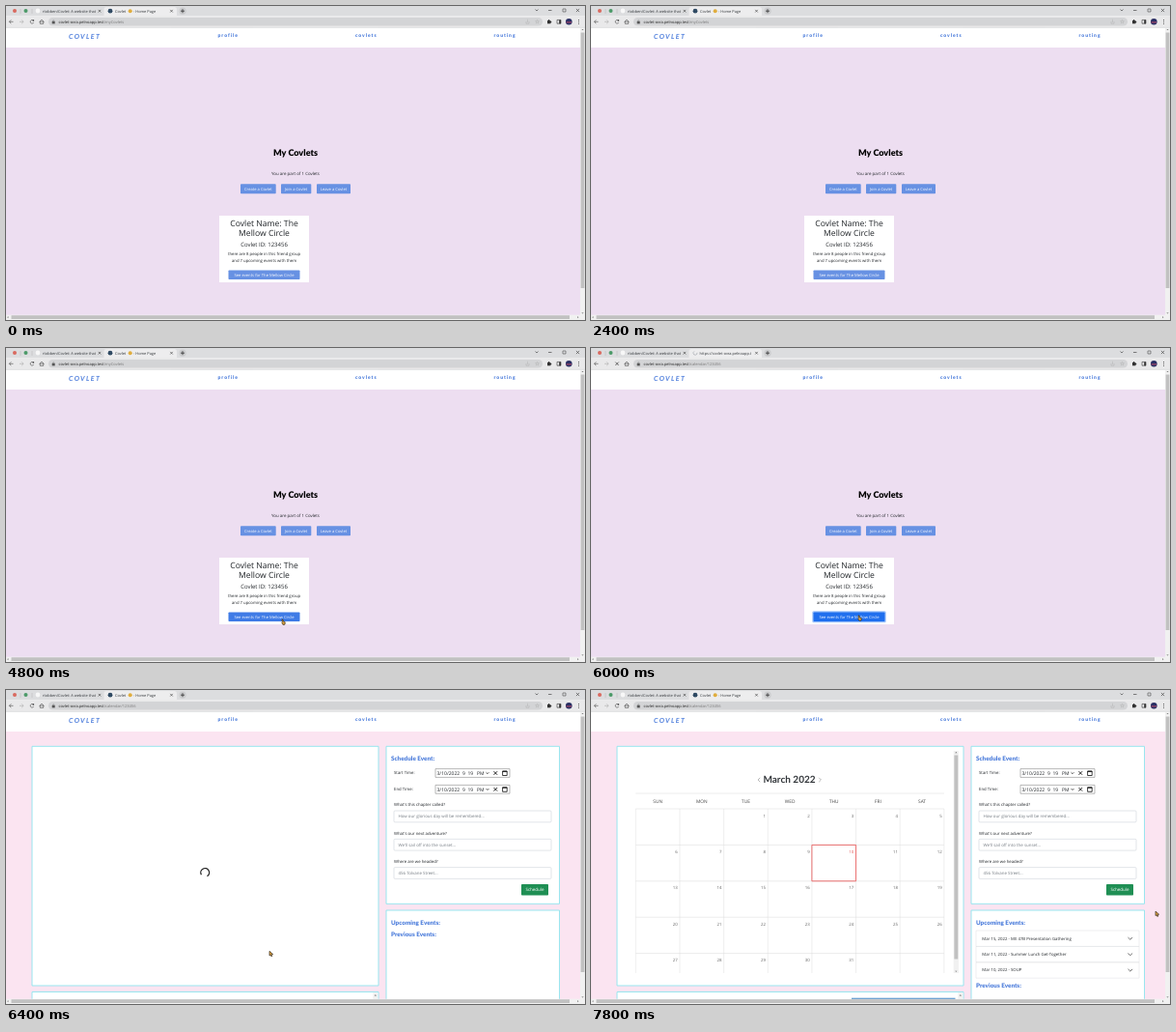
An HTML page with a canvas for the animation above (8000 ms loop, 600 by 325 pixels).

```html
<!DOCTYPE html>
<html lang="en">
<head>
<meta charset="utf-8">
<title>Covlet - Home Page</title>
<style>
html, body { margin: 0; width: 100%; height: 100%; overflow: hidden; background: #fff; }
canvas { display: block; width: 100vw; height: 100vh; }
</style>
</head>
<body>
<canvas id="stage"></canvas>
<script>
const W = 600, H = 325, LOOP = 8000;
const canvas = document.getElementById('stage');
const ctx = canvas.getContext('2d');
const dpr = window.devicePixelRatio || 1;
canvas.width = W * dpr;
canvas.height = H * dpr;

const SANS = '"Open Sans", sans-serif', ROUND = 'Lato, sans-serif', SERIF = '"Liberation Serif", serif';
const BLUE = '#4f7fdc', BUTTON = '#6791e3', INK = '#212529';
const HOST = 'covlet-ovra.pelnoapp.test';

// Times at which the page changes
const HOVER = 4800, PRESS = 5600, LOADING = 5800, BARE = 6200, STYLED = 6400, READY = 6800;

// Pointer path: time, x, y
const PATH = [
  [3400, 124, 329], [3600, 128, 318.3], [4800, 286, 281], [5400, 277, 276.5],
  [6200, 277, 277], [6400, 273, 270.3], [6700, 292, 264], [7400, 568, 234], [7800, 585, 229]
];

function rect(x, y, w, h, color, r = 0) {
  ctx.fillStyle = color;
  ctx.beginPath();
  ctx.roundRect(x, y, w, h, r);
  ctx.fill();
}

function frame(x, y, w, h, color, line = 0.5, r = 0) {
  ctx.strokeStyle = color;
  ctx.lineWidth = line;
  ctx.beginPath();
  ctx.roundRect(x, y, w, h, r);
  ctx.stroke();
}

function path(points, color = '#444', line = 0.6) {
  ctx.strokeStyle = color;
  ctx.lineWidth = line;
  ctx.beginPath();
  points.forEach(([x, y]) => ctx.lineTo(x, y));
  ctx.stroke();
}

function arc(x, y, r, from, to, color, line) {
  ctx.strokeStyle = color;
  ctx.lineWidth = line;
  ctx.beginPath();
  ctx.arc(x, y, r, from, to);
  ctx.stroke();
}

function dot(x, y, r, color) {
  ctx.fillStyle = color;
  ctx.beginPath();
  ctx.arc(x, y, r, 0, Math.PI * 2);
  ctx.fill();
}

function text(str, x, y, size, o = {}) {
  ctx.font = `${o.style || ''} ${o.weight || 400} ${size}px ${o.font || SANS}`;
  ctx.textRendering = 'geometricPrecision';
  ctx.letterSpacing = (o.space || 0) + 'px';
  ctx.textAlign = o.align || 'left';
  ctx.textBaseline = 'alphabetic';
  ctx.fillStyle = o.color || INK;
  ctx.fillText(str, x, y + size * 0.34);
  const width = ctx.measureText(str).width;
  ctx.letterSpacing = '0px';
  return width;
}

const centred = (str, x, y, size, o) => text(str, x, y, size, { align: 'center', ...o });

function cross(x, y, r, color = '#333', line = 0.6) {
  path([[x - r, y - r], [x + r, y + r]], color, line);
  path([[x - r, y + r], [x + r, y - r]], color, line);
}

function chevron(x, y, w, h, color, line) {
  path([[x - w, y - h], [x, y + h], [x + w, y - h]], color, line);
}

function clipped(x, y, w, h, draw) {
  ctx.save();
  ctx.beginPath();
  ctx.rect(x, y, w, h);
  ctx.clip();
  draw();
  ctx.restore();
}

function triangle(x, y, dx, dy, color = '#666') {
  ctx.fillStyle = color;
  ctx.beginPath();
  ctx.moveTo(x + dx, y + dy);
  ctx.lineTo(x - dy, y - dx);
  ctx.lineTo(x + dy, y + dx);
  ctx.fill();
}

function tabs(t, loading) {
  rect(0, 0, W, 10.5, '#dcdddf');
  rect(101.5, 1, 75.5, 10, '#ededee', [2.5, 2.5, 0, 0]);
  dot(9, 5, 2, '#d9695f');
  dot(20.5, 5, 2, '#4b9a68');
  dot(33, 5, 2.4, '#f7f7f7');
  path([[15, 3], [15, 8]], '#aaa', 0.4);
  path([[27, 3], [27, 8]], '#aaa', 0.4);
  const label = { color: '#33373b' };
  clipped(38, 0, 55, 10, () => text('rtobben/Covlet: A website that', 38, 5.2, 3.9, label));
  cross(97, 5.2, 1.3);
  if (loading) {
    const a = t / 160;
    arc(108, 5.2, 2, a, a + 4.4, '#9aa0a6', 0.6);
    clipped(112, 0, 54, 10, () => text('https://' + HOST, 112.5, 5.2, 3.9, label));
  } else {
    dot(108, 5.2, 2.4, '#2f4a63');
    text('Covlet', 113, 5.2, 3.9, label);
    dot(128.7, 5.2, 2, '#e0ad3d');
    text('- Home Page', 132, 5.2, 3.9, label);
  }
  cross(171.5, 5.2, 1.3);
  dot(183, 5.2, 3.6, '#cbccce');
  path([[181, 5.2], [185, 5.2]], '#222', 0.7);
  path([[183, 3.2], [183, 7.2]], '#222', 0.7);
  chevron(550, 4.3, 1.5, 0.7, '#333');
  path([[562, 4.5], [565.5, 4.5]], '#333');
  frame(577, 3, 3, 3, '#333');
  cross(592.5, 4.5, 1.6);
}

function toolbar(calendar, loading) {
  rect(0, 10.5, W, 12, '#e9e9ea');
  path([[0, 22.4], [W, 22.4]], '#cfd0d2', 0.5);
  path([[7.5, 16.3], [3.5, 16.3]], '#444');
  path([[5.3, 14.4], [3.4, 16.3], [5.3, 18.2]], '#444');
  path([[14, 16.3], [18, 16.3]], '#aaa');
  path([[16.2, 14.4], [18.1, 16.3], [16.2, 18.2]], '#aaa');
  if (loading) cross(27, 16.3, 1.7, '#333', 0.7);
  else {
    arc(27, 16.3, 1.8, 0.4, 5.4, '#444', 0.6);
    rect(27.6, 14.2, 1.5, 1.5, '#444');
  }
  path([[34.5, 16.5], [37, 14.2], [39.5, 16.5]], '#444');
  frame(35.3, 16.2, 3.4, 2.2, '#444', 0.6);
  rect(44, 12, 512, 8.6, '#d3d4d6', 4.3);
  rect(47.7, 15.9, 3, 2.5, '#555');
  arc(49.2, 15.8, 0.9, Math.PI, Math.PI * 2, '#555', 0.5);
  const w = text(HOST, 54.5, 16.2, 4, { color: '#222' });
  text(calendar ? '/calendar/123456' : '/myCovlets', 54.5 + w, 16.2, 4, { color: '#777' });
  path([[539, 16], [539, 18.3], [542, 18.3], [542, 16]], '#aaa', 0.4);
  path([[540.5, 17], [540.5, 13.8]], '#aaa', 0.4);
  ctx.beginPath();
  for (let i = 0; i < 10; i++) {
    const a = i * Math.PI / 5 - Math.PI / 2, r = i % 2 ? 0.9 : 2;
    ctx.lineTo(550.5 + r * Math.cos(a), 16.3 + r * Math.sin(a));
  }
  ctx.closePath();
  ctx.lineWidth = 0.4;
  ctx.stroke();
  rect(561, 15, 3.4, 3.3, '#333');
  dot(562.6, 14.8, 0.8, '#333');
  dot(564.6, 16.6, 0.8, '#333');
  frame(571, 14.4, 4, 3.8, '#333', 0.6);
  rect(573.2, 14.4, 1.8, 3.8, '#333');
  dot(583.3, 16.3, 3.3, '#282e63');
  rect(580.6, 16.3, 5.4, 1.2, '#a44668');
  [14.4, 16.3, 18.2].forEach(y => dot(593.5, y, 0.5, '#333'));
}

function scrollbars() {
  rect(595, 23, 5, 302, '#f1f1f1');
  rect(0, 319.7, 600, 5.3, '#f1f1f1');
  rect(595.6, 27.5, 3.8, 264.5, '#c1c1c1');
  rect(5.5, 320.3, 578.5, 3.7, '#c1c1c1');
  triangle(597.5, 25, 0, -1.1);
  triangle(597.5, 317.5, 0, 1.1);
  triangle(2.4, 322.2, -1.1, 0);
  triangle(592.3, 322.2, 1.1, 0);
}

function nav() {
  rect(0, 23, 595, 20, '#fff');
  text('COVLET', 65, 31.6, 7, { font: ROUND, style: 'italic', weight: 700, color: BLUE, space: 1.4 });
  [['profile', 219.5], ['covlets', 362], ['routing', 505.5]].forEach(([s, x]) =>
    text(s, x, 30.6, 5, { font: ROUND, weight: 900, color: BLUE, space: 0.95 }));
}

function button(label, x, y, w, h, size = 4.1, color = BUTTON) {
  rect(x, y, w, h, color, 0.8);
  centred(label, x + w / 2, y + h / 2, size, { color: '#fff', weight: 500 });
}

function groupsPage(t) {
  rect(0, 43, 595, 277, '#eddef1');
  nav();
  centred('My Covlets', 300, 152.3, 9.1, { font: ROUND, weight: 900, color: '#000' });
  centred('You are part of 1 Covlets', 300, 173.3, 4.4);
  button('Create a Covlet', 243, 184.2, 36.7, 10);
  button('Join a Covlet', 285, 184.2, 31.3, 10);
  button('Leave a Covlet', 322, 184.2, 35, 10);
  rect(221, 217, 93, 69, '#fff');
  centred('Covlet Name: The', 267.5, 225, 8.6, { weight: 500 });
  centred('Mellow Circle', 267.5, 235.3, 8.6, { weight: 500 });
  centred('Covlet ID: 123456', 267.5, 247, 6, { weight: 500 });
  centred('there are 8 people in this friend group', 267.5, 257, 4.25);
  centred('and 7 upcoming events with them', 267.5, 263.8, 4.25);
  const pressed = t >= PRESS;
  if (pressed) rect(229.3, 272.3, 76.4, 12, '#9fc3fa', 1.5);
  const color = pressed ? '#1f6fee' : t >= HOVER ? '#3f7be6' : BUTTON;
  button('See events for The Mellow Circle', 230.5, 273.4, 74, 9.7, 4.15, color);
}

function barePage() {
  ['Profile', 'Covlets', 'Routing'].forEach((s, i) => {
    const y = 30 + i * 5.7, color = i ? '#6a2c9c' : '#3a30c8';
    dot(10.8, y, 0.9, '#111');
    const w = text(s, 15, y, 5.2, { font: SERIF, color });
    path([[15, y + 2.4], [15 + w, y + 2.4]], color, 0.4);
  });
}

function panel(x, y, w, h) {
  rect(x, y, w, h, '#fff');
  frame(x, y, w, h, '#8ee5ee', 0.9);
}

function heading(str, y) {
  text(str, 399, y, 6.3, { font: ROUND, weight: 900, color: BLUE });
}

function dateField(label, y) {
  text(label, 402, y, 4.3);
  frame(445, y - 4.4, 77, 8.8, '#8a8a8a', 0.6);
  text('3/10/2022', 446.5, y, 5);
  text('9', 473, y, 5);
  text('19', 478.5, y, 5);
  text('PM', 488, y, 5);
  chevron(499, y, 1.4, 0.7, '#222', 0.8);
  cross(507.3, y, 1.8, '#111', 0.9);
  frame(514.6, y - 2, 4.6, 4.5, '#111', 0.8);
  path([[514.6, y - 1.7], [519.2, y - 1.7]], '#111', 1);
}

function field(label, hint, y) {
  text(label, 402, y, 4.3);
  frame(402, y + 6, 163, 11.8, '#ced4da', 0.6, 1);
  text(hint, 406.5, y + 12, 4.4, { color: '#747b82' });
}

function form() {
  panel(394, 58.3, 179.5, 163);
  heading('Schedule Event:', 70.8);
  dateField('Start Time:', 86);
  dateField('End Time:', 102.8);
  field("What's this chapter called?", 'How our glorious day will be remembered...', 119);
  field("What's our next adventure?", "We'll sail off into the sunset...", 148.3);
  field('Where are we headed?', '456 Tolvane Street...', 177.6);
  button('Schedule', 534, 201, 28, 11.6, 4.5, '#1f8f54');
}

function events(ready) {
  panel(394, 228, 179.5, 110);
  heading('Upcoming Events:', 240.5);
  heading('Previous Events:', ready ? 306 : 253);
  if (!ready) return;
  ['Mar 15, 2022 - MX 47B Presentation Gathering', 'Mar 11, 2022 - Summer Lunch Get-Together', 'Mar 10, 2022 - SOUP']
    .forEach((s, i) => {
      const y = 249 + i * 16.4;
      frame(399, y, 169, 16.4, '#dcdfe2', 0.5);
      text(s, 405.3, y + 8.2, 4.3);
      chevron(558.8, y + 8.2, 2.3, 1.1, '#333', 0.7);
    });
}

function calendar() {
  const x0 = 46.3, y0 = 123, cw = 45.65, rh = 37.4, right = x0 + cw * 7, bottom = 293;
  centred('March 2022', 205.5, 93, 10, { font: ROUND, weight: 700, color: '#33373b' });
  path([[175.2, 90.8], [173, 93], [175.2, 95.2]], '#888', 0.6);
  path([[236.2, 90.8], [238.4, 93], [236.2, 95.2]], '#888', 0.6);
  path([[x0, 107], [right, 107]], '#d8d8d8', 0.5);
  ['SUN', 'MON', 'TUE', 'WED', 'THU', 'FRI', 'SAT'].forEach((s, i) =>
    centred(s, x0 + cw * (i + 0.5), 115.2, 4.8, { color: '#444' }));
  for (let r = 0; r < 5; r++) path([[x0, y0 + r * rh], [right, y0 + r * rh]], '#d8d8d8', 0.5);
  for (let c = 0; c <= 7; c++) path([[x0 + c * cw, y0], [x0 + c * cw, bottom]], '#dedede', 0.5);
  for (let d = 1; d <= 31; d++) {
    const cell = d + 1, c = cell % 7, r = Math.floor(cell / 7);
    text(String(d), x0 + (c + 1) * cw - 2.2, y0 + 7.2 + r * rh, 4.4,
      { align: 'right', color: d === 10 ? '#e35b5b' : '#666' });
  }
  frame(x0 + cw * 4, y0 + rh, cw, rh, '#ea6464', 0.9);
  rect(375.7, 63, 5.3, 230, '#f1f1f1');
  rect(376.4, 67.5, 3.9, 211, '#c1c1c1');
  triangle(378.3, 65.2, 0, -1.1);
  triangle(378.3, 290.7, 0, 1.1);
}

function calendarPage(t) {
  const ready = t >= READY;
  rect(0, 43, 595, 277, '#fbe4f1');
  nav();
  panel(27, 58.3, 359, 247.7);
  panel(27, 312.5, 359, 30);
  rect(380.3, 313.2, 5, 7, '#f1f1f1');
  triangle(382.8, 316.5, 0, -1.2);
  if (ready) {
    calendar();
    rect(270, 318.7, 107.5, 2, '#4288c7');
  } else {
    const a = (t - STYLED) / 1000 * Math.PI * 2 + 2.6;
    arc(206.2, 189, 4.4, a, a + 4.7, '#222', 1.3);
  }
  form();
  events(ready);
}

function pointerAt(t) {
  if (t < PATH[0][0]) return null;
  const i = PATH.findIndex(p => p[0] > t);
  if (i < 0) return PATH[PATH.length - 1].slice(1);
  const [t0, x0, y0] = PATH[i - 1], [t1, x1, y1] = PATH[i];
  const k = (t - t0) / (t1 - t0), e = k * k * (3 - 2 * k);
  return [x0 + (x1 - x0) * e, y0 + (y1 - y0) * e];
}

function pointer(t) {
  const p = pointerAt(t);
  if (!p) return;
  const hand = t >= HOVER && t < STYLED;
  const shape = hand
    ? [[0, 0], [1, 0], [1.4, 1.9], [3.3, 2.8], [3, 5.2], [1, 5.4], [-0.2, 3.5], [0.3, 2.8]]
    : [[0, 0], [0, 4.6], [1.1, 3.8], [1.9, 5.5], [2.8, 5], [2.1, 3.4], [3.6, 3.2]];
  ctx.save();
  ctx.translate(p[0], p[1]);
  ctx.beginPath();
  shape.forEach(([x, y]) => ctx.lineTo(x, y));
  ctx.closePath();
  ctx.fillStyle = '#dca23f';
  ctx.strokeStyle = '#3a2f20';
  ctx.lineWidth = 0.7;
  ctx.fill();
  ctx.stroke();
  ctx.restore();
}

function draw(t) {
  ctx.setTransform(dpr, 0, 0, dpr, 0, 0);
  rect(0, 0, W, H, '#fff');
  if (t < BARE) groupsPage(t);
  else if (t < STYLED) barePage();
  else calendarPage(t);
  if (t < BARE || t >= STYLED) scrollbars();
  tabs(t, t >= LOADING && t < BARE);
  toolbar(t >= LOADING, t >= LOADING && t < STYLED);
  pointer(t);
}

const start = performance.now();
function tick() {
  draw((performance.now() - start) % LOOP);
  requestAnimationFrame(tick);
}
tick();
</script>
</body>
</html>
```
